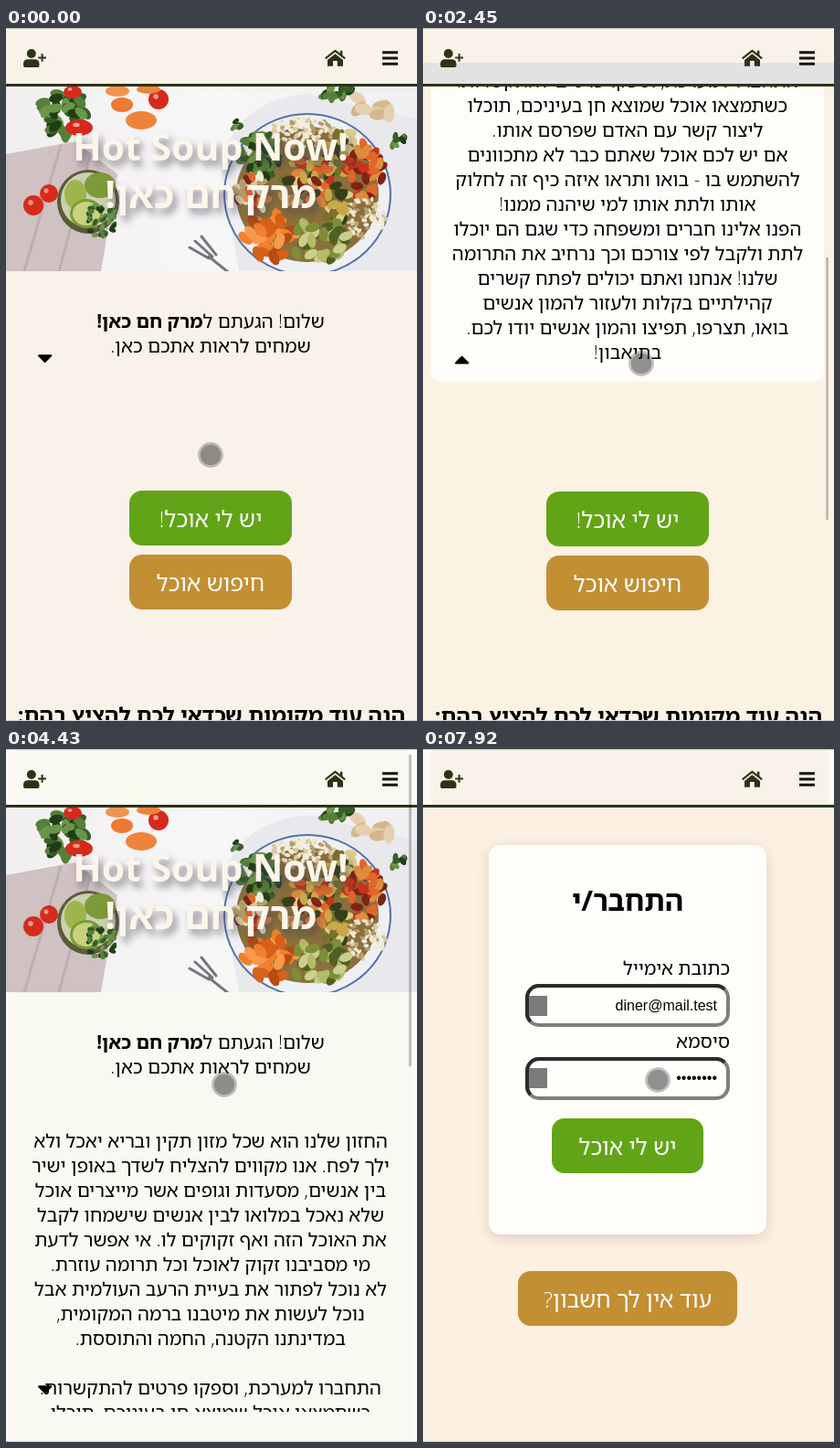
These frames come from a looping animation (450x758 px, 8000 ms). An HTML page:

```html
<!DOCTYPE html>
<html lang="he">
<head>
<meta charset="utf-8">
<title>Shared meals</title>
<style>
  html, body { margin: 0; width: 100%; height: 100%; overflow: hidden; background: #f9f2e8; }
  svg { display: block; width: 100vw; height: 100vh; }
  text {
    font: 300 20.6px "Open Sans", "Noto Sans Hebrew", "Noto Sans", "Liberation Sans", sans-serif;
    direction: rtl; text-anchor: middle; fill: #000;
  }
  .warm  { --page: #f9f2e8; --panel: #fdfbf4; --head: #f8f2e8; --band: none; --side: #f9f2e8; }
  .pale  { --page: #fbfaf5; --panel: #fcfbf7; --head: #f8f0e5; --band: #fbfaf6; --side: #fbfaf5; }
  .long  { --page: #fcf2e3; --panel: #fefdf9; --head: #f8f2e8; --band: #e2e2e2; --side: #fcf2e3; }
  .light { --page: #f9f8f1; --panel: #f9f8f1; --head: #f9f8f1; --band: none; --side: #fbfaf6; }
  .edged { --page: #f9f2e8; --panel: #f9f2e8; --head: #f8f2e8; --band: none; --side: #fdfaf4; }
  .page { fill: var(--page); } .panel { fill: var(--panel); } .head { fill: var(--head); }
  .band { fill: var(--band); } .side { fill: var(--side); }
  .bold { font-weight: 700; }
  .hero { font-size: 41px; font-weight: 700; fill: #fcf5ea; filter: drop-shadow(4px 6px 4px rgba(60, 60, 75, .6)); }
  .ltr { direction: ltr; }
  .button { font-size: 24.7px; fill: #fff; }
  .label { text-anchor: start; }
  .field { font: 16px "Liberation Sans", sans-serif; direction: ltr; text-anchor: end; }
  .card { filter: drop-shadow(0 4px 7px rgba(110, 80, 50, .2)); }
</style>
</head>
<body>
<svg id="stage" viewBox="0 0 450 758" class="warm"></svg>
<script>
const LOOP = 8000, CLOSED = 386, OPEN = 1028, NAME = 'מרק חם כאן!';
const stage = document.getElementById('stage');

const vision = `החזון שלנו הוא שכל מזון תקין ובריא יאכל ולא
ילך לפח. אנו מקווים להצליח לשדך באופן ישיר
בין אנשים, מסעדות וגופים אשר מייצרים אוכל
שלא נאכל במלואו לבין אנשים שישמחו לקבל
את האוכל הזה ואף זקוקים לו. אי אפשר לדעת
מי מסביבנו זקוק לאוכל וכל תרומה עוזרת.
לא נוכל לפתור את בעיית הרעב העולמית אבל
נוכל לעשות את מיטבנו ברמה המקומית,
במדינתנו הקטנה, החמה והתוססת.

התחברו למערכת, וספקו פרטים להתקשרות.
כשתמצאו אוכל שמוצא חן בעיניכם, תוכלו
ליצור קשר עם האדם שפרסם אותו.
אם יש לכם אוכל שאתם כבר לא מתכוונים
להשתמש בו - בואו ותראו איזה כיף זה לחלוק
אותו ולתת אותו למי שיהנה ממנו!
הפנו אלינו חברים ומשפחה כדי שגם הם יוכלו
לתת ולקבל לפי צורכם וכך נרחיב את התרומה
שלנו! אנחנו ואתם יכולים לפתח קשרים
קהילתיים בקלות ולעזור להמון אנשים
בואו, תצרפו, תפיצו והמון אנשים יודו לכם.
בתיאבון!`.split('\n');

const text = (x, y, value, cls = '') => `<text x="${x}" y="${y}" class="${cls}">${value}</text>`;
const box = (x, y, w, h, attrs) => `<rect x="${x}" y="${y}" width="${w}" height="${h}" ${attrs}/>`;
const oval = (x, y, rx, ry, fill, attrs = '') =>
  `<ellipse cx="${x}" cy="${y}" rx="${rx}" ry="${ry}" fill="${fill}" ${attrs}/>`;
const path = (d, attrs = '') => `<path d="${d}" ${attrs}/>`;
const button = (x, y, w, fill, label) =>
  box(x, y, w, 60, `rx="14" fill="${fill}"`) + text(224, y + 40, label, 'button');

let seed = 7;
const random = () => (seed = (seed * 16807) % 2147483647) / 2147483647;

// Fills an oval patch with small tilted pieces of food.
function scatter(x, y, rx, ry, count, size, colors) {
  let out = '';
  for (let i = 0; i < count; i++) {
    const angle = random() * 2 * Math.PI, reach = Math.sqrt(random());
    const px = x + rx * reach * Math.cos(angle), py = y + ry * reach * Math.sin(angle);
    out += oval(px.toFixed(1), py.toFixed(1), size, size * .6, colors[i % colors.length],
      `transform="rotate(${(random() * 180) | 0} ${px.toFixed(1)} ${py.toFixed(1)})"`);
  }
  return out;
}

function photo() {
  const leaf = ['#355f25', '#54803a', '#213d18', '#6b9648'];
  const grain = ['#d9caa0', '#efe8cf', '#b39d6c', '#f2ecdc'];
  const carrot = ['#f0812c', '#d8601a', '#f79a4a', '#b84c14'];
  const pepper = ['#c8321c', '#e2662a', '#7c2416', '#e08a3c'];
  const sprout = ['#7d8e38', '#b3bb68', '#515f24', '#c9cf8c'];
  const squash = ['#33401c', '#c9a846', '#77702c', '#e0cd8a'];
  const tomato = (x, y, rx, ry = rx) =>
    oval(x, y, rx, ry, '#d62a1c') + oval(x - 3, y - 3, rx / 4, ry / 4, '#f2a08e');
  return box(0, 64, 450, 202, 'fill="url(#table)"')
    + path('M235 150Q250 80 330 72L450 100V266H255Z', 'fill="#e9e9ed"')
    + path('M0 138L76 124L122 160L104 266H0Z', 'fill="#d0c1c2"')
    + path('M60 128L20 266M92 140L58 266', 'stroke="#bdaeb2" stroke-width="3"')
    + scatter(62, 93, 26, 26, 36, 8, leaf)
    + tomato(167, 78, 11) + tomato(80, 109, 15, 9) + tomato(73, 70, 10, 7)
    + oval(148, 101, 17, 10, '#f0833a') + oval(127, 84, 12, 8, '#ee7930')
    + oval(122, 69, 13, 6, '#f29350') + oval(156, 67, 13, 5, '#f0833a')
    + tomato(47, 181, 10) + tomato(30, 194, 11)
    + oval(90, 190, 34, 35, '#5b5a3c') + oval(90, 188, 30, 30, '#cbd0b2')
    + oval(103, 172, 17, 14, '#7b9b38') + oval(76, 182, 12, 16, '#9cb64c')
    + oval(88, 203, 18, 16, '#7b9b38') + oval(88, 203, 15, 13, '#c8d27e')
    + scatter(104, 210, 17, 18, 34, 4, leaf)
    + path('M201 240L222 252M207 233L226 250M214 228L230 248M222 250L247 270',
      'stroke="#77767f" stroke-width="3" stroke-linecap="round"')
    + scatter(405, 84, 26, 12, 9, 10, ['#e5cfae', '#d4b78d'])
    + scatter(363, 72, 18, 8, 14, 6, leaf) + scatter(252, 106, 6, 4, 5, 4, leaf)
    + scatter(432, 125, 10, 10, 7, 5, leaf)
    + oval(330, 182, 91, 88, '#eef0f4', 'stroke="#5672a6" stroke-width="2"')
    + oval(330, 182, 78, 74, '#8a6f3c')
    + scatter(325, 115, 36, 17, 90, 3.5, grain)
    + scatter(277, 140, 22, 26, 44, 6, leaf)
    + scatter(370, 135, 25, 24, 34, 7, squash)
    + scatter(393, 158, 20, 34, 40, 7, pepper)
    + scatter(330, 170, 32, 28, 50, 7, [...squash, ...pepper])
    + scatter(270, 180, 18, 22, 34, 6, [...pepper, ...grain])
    + scatter(392, 208, 24, 22, 75, 3, grain)
    + scatter(362, 195, 16, 18, 22, 7, squash)
    + scatter(288, 227, 28, 25, 34, 9, carrot)
    + scatter(343, 233, 32, 23, 36, 8, sprout);
}

function field(y) {
  const h = 43;
  return box(114, y, 220, h, 'rx="13" fill="#fffefa" stroke="#7f7f7f" stroke-width="4"')
    + path(`M117.8 ${y + h - 3.8}A13 13 0 0 1 114 ${y + h - 13}V${y + 13}A13 13 0 0 1 127 ${y}H321A13 13 0 0 1 330.2 ${y + 3.8}`,
      'fill="none" stroke="#2b2b2b" stroke-width="4"');
}

const home = `<g id="home">
  ${box(0, 0, 450, 758, 'class="page"')}
  ${box(0, 64, 9, 694, 'class="side"')}${box(444, 64, 6, 694, 'class="side"')}
  <g id="scroller">
    <rect id="panel" x="9" y="357" width="430" rx="12" class="panel"/>
    ${box(220, 360, 33, 26, 'id="patch" fill="#fffdf9"')}
    <g clip-path="url(#heroClip)">${photo()}</g>
    ${text(224, 145, 'Hot Soup Now!', 'hero ltr')}${text(224, 197, NAME, 'hero')}
    ${text(224, 328, `שלום! הגעתם ל<tspan class="bold">${NAME}</tspan>`)}
    ${text(224, 355, 'שמחים לראות אתכם כאן.')}
    <g clip-path="url(#panelClip)">${vision.map((line, i) => text(224, 436 + 27 * i, line)).join('')}</g>
    <g id="below">
      <path id="caret" stroke="#000" stroke-width="2" stroke-linejoin="round"/>
      ${button(135, 506, 178, '#62a417', 'יש לי אוכל!')}
      ${button(135, 576, 178, '#c28f33', 'חיפוש אוכל')}
      <text x="225" y="760" class="bold" style="font-size:23.8px">הנה עוד מקומות שכדאי לכם להציץ בהם:</text>
    </g>
  </g>
</g>`;

const login = `<g id="login">
  ${box(0, 64, 450, 694, 'fill="#fbf0e2"')}
  ${box(72, 105, 304, 426, 'rx="13" fill="#fffdf9" class="card"')}
  <text x="224" y="177" class="bold" style="font-size:31px">התחבר/י</text>
  ${text(336, 247, 'כתובת אימייל', 'label')}${field(259)}
  ${text(336, 327, 'סיסמא', 'label')}${field(339)}
  <g id="filled">
    ${box(116, 270, 20, 22, 'fill="#7b7b7b"')}${box(116, 349, 20, 22, 'fill="#7b7b7b"')}
    ${text(322, 286, 'diner@mail.test', 'field')}${text(322, 365, '••••••••', 'field')}
  </g>
  ${button(141, 404, 166, '#62a417', 'יש לי אוכל')}
  ${button(104, 571, 240, '#c28f33', 'עוד אין לך חשבון?')}
</g>`;

const header = `
  ${box(0, 0, 450, 61, 'class="head"')}
  ${box(0, 1, 9, 60, 'class="side"')}${box(444, 1, 6, 60, 'class="side"')}
  ${box(0, 38, 450, 23, 'class="band"')}
  ${box(0, 61, 450, 3, 'fill="#2d3416"')}${box(0, 0, 450, 1, 'fill="#c3bfbd"')}
  <g fill="#2d3416">
    <circle cx="27.8" cy="28" r="5"/>
    ${path('M20.8 43Q19 43 19 41V39.5Q19 34.3 24.2 34.3H31.3Q36.5 34.3 36.5 39.5V41Q36.5 43 34.7 43Z')}
    ${path('M39.6 28V36.8M35.2 32.4H44', 'stroke="#2d3416" stroke-width="2"')}
    ${path('M349.7 33.3L360.4 24.9L371.2 33.3', 'fill="none" stroke="#2d3416" stroke-width="2.1" stroke-linejoin="round"')}
    ${path('M352 41.8V35L360.4 28.2L369 35V41.8H362.8V36H358V41.8ZM365.8 24.7H368.4V31L365.8 29Z')}
  </g>
  ${path('M412 26.8H429M412 33H429M412 39.2H429', 'stroke="#14160a" stroke-width="3"')}`;

stage.innerHTML = `<defs>
    <linearGradient id="table"><stop stop-color="#f1eeef"/><stop offset=".5" stop-color="#f8f7f8"/><stop offset="1" stop-color="#efeef0"/></linearGradient>
    <clipPath id="heroClip">${box(0, 64, 450, 202, '')}</clipPath>
    <clipPath id="panelClip"><rect id="panelEdge" x="9" y="357" width="430"/></clipPath>
  </defs>${home}${login}${header}
  <rect id="bar" x="441" width="3" fill="#000" opacity=".23"/>
  ${box(0, 757, 450, 1, 'fill="#d0cecb"')}
  <g id="cursor">
    <circle r="12.6" fill="none" stroke="#666" stroke-width="2.6" opacity=".4"/>
    <circle r="11.3" opacity=".43"/>
  </g>`;

// Each track is a list of [time, value] holds.
const tracks = {
  theme: [[0, 'warm'], [1940, 'pale'], [2060, 'long'], [4010, 'light'], [4730, 'edged']],
  scroll: [[0, 0], [1940, 83], [2060, 300], [2190, 510], [2320, 615], [2450, 641],
    [3060, 610], [3210, 530], [3360, 500], [3610, 400], [3740, 200], [3870, 50], [4010, 0]],
  bottom: [[0, CLOSED], [1200, 470], [1350, 800], [1500, OPEN],
    [4160, 1000], [4290, 900], [4430, 725], [4580, 500], [4730, CLOSED]],
  cursor: [[0, [224, 467]], [500, [226, 450]], [630, [232, 410]], [770, [237, 375]], [900, [239, 362]],
    [2060, [239, 367]], [5300, [237, 382]], [5440, [229, 425]], [5580, [225, 470]], [5720, [228, 502]],
    [5860, [230, 512]], [6960, [234, 490]], [7100, [248, 420]], [7230, [262, 345]], [7370, [269, 302]],
    [7500, [271, 290]], [7770, [265, 324]], [7920, [257, 362]]],
};
const at = (track, t) => track.reduce((held, [time, value]) => time <= t ? value : held, track[0][1]);
const part = Object.fromEntries([...stage.querySelectorAll('[id]')].map(el => [el.id, el]));
const show = (el, visible) => el.setAttribute('display', visible ? 'inline' : 'none');
const within = (t, from, to = LOOP) => t >= from && t < to;

function render(t) {
  const scroll = at(tracks.scroll, t), bottom = at(tracks.bottom, t);
  stage.setAttribute('class', at(tracks.theme, t));
  part.scroller.setAttribute('transform', `translate(0 ${-scroll})`);
  part.below.setAttribute('transform', `translate(0 ${bottom - CLOSED})`);
  part.panel.setAttribute('height', bottom - 357);
  part.panelEdge.setAttribute('height', bottom - 357);
  part.caret.setAttribute('d', within(t, 1200, 4160) ? 'M36 365.5H49.3L42.6 358.7Z' : 'M36 358.2H49.3L42.6 365Z');
  part.bar.setAttribute('y', 6.3 + scroll * .3817);
  part.bar.setAttribute('height', 730 * 752 / (1914 - OPEN + bottom));
  part.cursor.setAttribute('transform', `translate(${at(tracks.cursor, t)})`);
  show(part.panel, bottom > CLOSED);
  show(part.patch, within(t, 5300));
  show(part.bar, within(t, 1940, 4730));
  show(part.login, within(t, 6150));
  show(part.filled, within(t, 6960));
}

const start = performance.now();
function tick() {
  render((performance.now() - start) % LOOP);
  requestAnimationFrame(tick);
}
tick();
</script>
</body>
</html>
```
